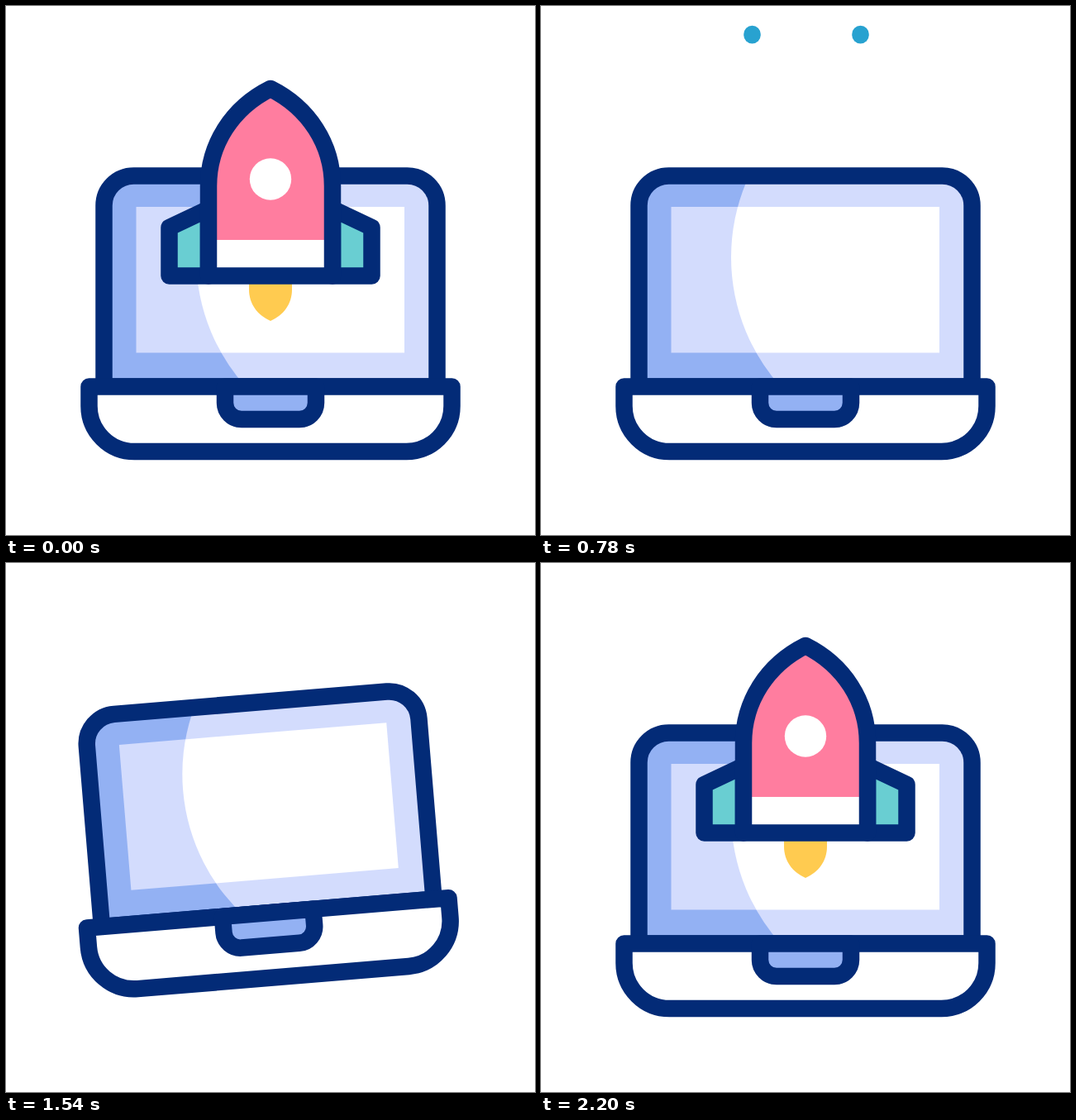
These frames come from a looping animation (640x640 px, 2.4 s). An HTML page:

```html
<!DOCTYPE html>
<html lang="en">
<head>
<meta charset="utf-8">
<title>Laptop rocket launch</title>
<style>
  html, body { margin: 0; width: 100%; height: 100%; overflow: hidden; background: #fff; }
  svg { display: block; width: 100%; height: 100%; }
  .line { stroke: #032b77; stroke-width: 20.5; stroke-linejoin: round; stroke-linecap: round; }
  .drop { stroke: #28a2d0; stroke-width: 20.5; stroke-linecap: round; }
  .mid { fill: #93b1f3; }
  .light { fill: #d3dcfd; }
  .white { fill: #fff; }
  .teal { fill: #69ced2; }
</style>
</head>
<body>
<svg viewBox="0 0 640 640">
  <defs>
    <path id="lid" d="M118.500 460.500V241.500a36 36 0 0 1 36-36h331a36 36 0 0 1 36 36v219z"/>
    <path id="hull" d="M245 326.500V218C245 167 274 123 320 100C366 123 395 167 395 218V326.500z"/>
    <clipPath id="lidClip"><use href="#lid"/></clipPath>
    <clipPath id="shine"><circle cx="464.500" cy="304" r="234.500"/></clipPath>
  </defs>

  <g id="laptop">
    <use href="#lid" class="mid"/>
    <g clip-path="url(#lidClip)"><circle class="light" cx="464.500" cy="304" r="234.500"/></g>
    <path class="light" d="M157.500 243H482V419.500H157.500z"/>
    <path class="white" clip-path="url(#shine)" d="M157.500 243H482V419.500H157.500z"/>
    <use href="#lid" class="line" fill="none"/>
    <path class="line white" d="M100.500 460.500H539.500V484a55 55 0 0 1-55 55H155.500a55 55 0 0 1-55-55z"/>
    <path class="line mid" d="M265 460.500V480a20 20 0 0 0 20 20h70a20 20 0 0 0 20-20V460.500z"/>
  </g>

  <g id="drops"></g>

  <g id="rocket">
    <path fill="#ffcb50" d="M294 328V343C294 360 304 374 320 381C336 374 346 360 346 343V328z"/>
    <path class="line teal" d="M245 245.500L197.500 268V326.500H245z"/>
    <path class="line teal" d="M395 245.500L442.500 268V326.500H395z"/>
    <use href="#hull" fill="#ff7d9f"/>
    <path class="white" d="M245 283H395V326H245z"/>
    <use href="#hull" class="line" fill="none"/>
    <circle class="white" cx="320" cy="209.500" r="25.200"/>
  </g>
</svg>
<script>
const LOOP = 2400;
const $ = id => document.getElementById(id);

// Progress from 0 to 1 between two times, eased at both ends
const ease = (t, from, to) => {
  const p = Math.min(1, Math.max(0, (t - from) / (to - from)));
  return (1 - Math.cos(Math.PI * p)) / 2;
};

// Eased value along [time, value] keys
const track = (t, keys) => keys.slice(1).reduce(
  (v, [time, value], i) => v + (value - keys[i][1]) * ease(t, keys[i][0], time), keys[0][1]);

const lift = [[780, 0], [1040, -37.8], [1320, 38.6], [1560, -38.5], [1800, 0]];
const tilt = [[780, 0], [1000, -4.8], [1260, 4.8], [1520, -4.8], [1800, 0]];

// Speed lines: the head runs ahead and the tail catches up
const inner = { from: 369.5, to: 34, head: [200, 780], tail: [300, 800] };
const outer = { from: 337, to: 100, head: [240, 740], tail: [320, 760] };
const drops = [[255.5, inner], [386.5, inner], [211, outer], [431, outer]].map(([x, run]) => {
  const line = document.createElementNS("http://www.w3.org/2000/svg", "line");
  line.setAttribute("class", "drop");
  line.setAttribute("x1", x);
  line.setAttribute("x2", x);
  $("drops").append(line);
  return { line, run };
});

function draw(t) {
  $("laptop").setAttribute("transform",
    `translate(0 ${track(t, lift)}) rotate(${track(t, tilt)} 320 500)`);

  for (const { line, run } of drops) {
    const y = span => run.from + (run.to - run.from) * ease(t, ...span);
    line.setAttribute("y1", y(run.head));
    line.setAttribute("y2", y(run.tail));
    line.style.display = t > run.head[0] && t < run.tail[1] ? "" : "none";
  }

  const size = t < 1860 ? 1 : ease(t, 1860, 2200);
  const rise = t < 1860 ? -457 * ease(t, 200, 780) : 0;
  $("rocket").setAttribute("transform",
    `translate(320 ${235 + rise}) scale(${size}) translate(-320 -235)`);
}

const start = performance.now();
function frame() {
  draw((performance.now() - start) % LOOP);
  requestAnimationFrame(frame);
}
frame();
</script>
</body>
</html>
```
